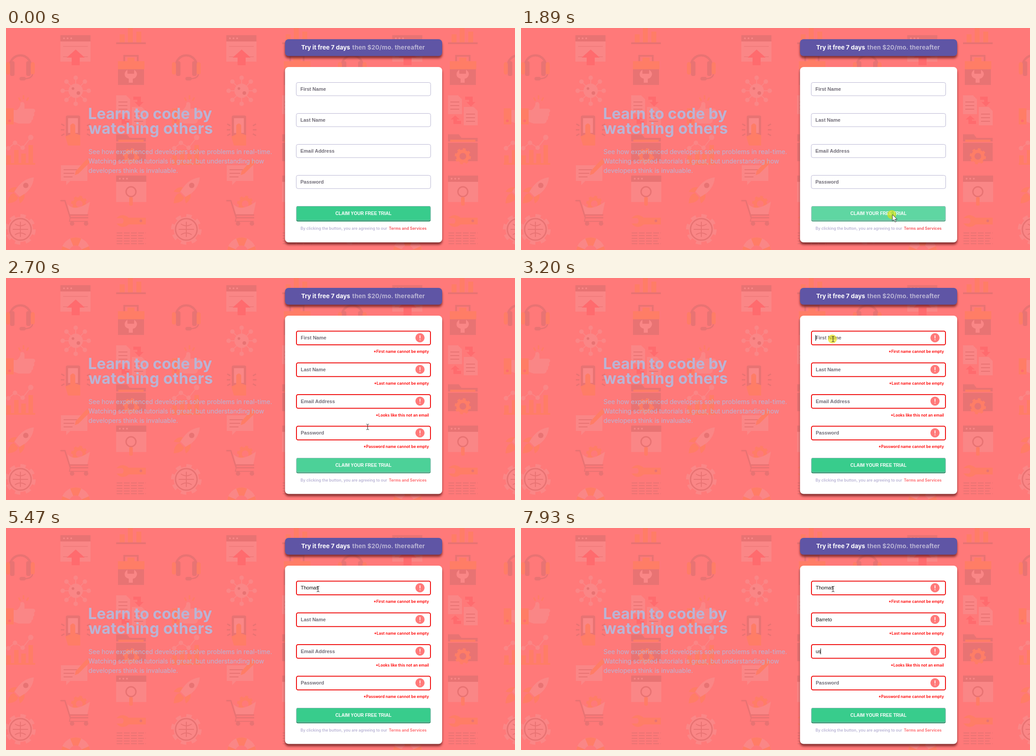
An HTML page for the animation above (8 s loop, 1132 px wide and 495 px high).

```html
<!DOCTYPE html>
<html lang="en">
<head>
<meta charset="utf-8">
<title>Sign-up form</title>
<style>
html, body { margin: 0; width: 100%; height: 100%; overflow: hidden; background: #ff7979; }
svg { display: block; width: 1132px; height: 495px; }
text { font-family: Inter, "Open Sans", sans-serif; fill: #b9b4d5; white-space: pre; }
.head { font-size: 34px; font-weight: 700; }
.body { font-size: 14px; }
.promo { font-size: 13.4px; font-weight: 700; }
.small { font-size: 8.7px; font-weight: 600; }
.hint, .value, .cta { font-family: "Liberation Sans", Arial, sans-serif; font-size: 11px; }
.hint { font-weight: 700; fill: #716d78; }
.value { fill: #111; }
.cta { font-size: 10px; font-weight: 700; fill: #fff; text-anchor: middle; }
.error { fill: #f00; text-anchor: end; }
.box { filter: drop-shadow(0 5px 2.5px rgba(60, 0, 0, .6)); }
.L { fill: #fa8686 } .D { fill: #e87373 } .O { fill: #ff7d66 } .R { fill: #ff6b6e }
.l, .d, .o { fill: none; stroke-width: 3 }
.l { stroke: #fa8686 } .d { stroke: #e87373 } .o { stroke: #ff7d66 }
</style>
</head>
<body>
<svg viewBox="0 0 1132 495">
  <defs><g id="tile"></g></defs>
  <rect width="1132" height="495" fill="#ff7979"/>
  <use href="#tile"/><use href="#tile" x="369"/><use href="#tile" x="738"/><use href="#tile" x="1107"/>
  <text class="head" x="182.5" y="203">Learn to code by</text>
  <text class="head" x="183.5" y="236" letter-spacing=".5">watching others</text>
  <text class="body" x="183.5" y="281">See how experienced developers solve problems in real-time.</text>
  <text class="body" x="183.5" y="302">Watching scripted tutorials is great, but understanding how</text>
  <text class="body" x="183.5" y="323">developers think is invaluable.</text>
  <g id="panel"></g>
</svg>
<script>
const LOOP = 8000;
const path = (c, d, more = '') => `<path class="${c}" d="${d}" ${more}/>`;
const rect = (c, x, y, w, h, r = 0) => `<rect class="${c}" x="${x}" y="${y}" width="${w}" height="${h}" rx="${r}"/>`;
const disc = (c, x, y, r, more = '') => `<circle class="${c}" cx="${x}" cy="${y}" r="${r}" ${more}/>`;
const text = (c, x, y, s, more = '') => `<text class="${c}" x="${x}" y="${y}" ${more}>${s}</text>`;
const many = (n, f) => Array.from({ length: n }, (_, i) => f(i)).join('');

// Background icons
const gear = (c, x, y, r) => disc(c, x, y, r * .62, `style="stroke-width:${r * .4}"`) +
  disc(c, x, y, r * .88, `pathLength="16" stroke-dasharray="1" style="stroke-width:${r * .25}"`);
const browser = (x, y) => rect('D', x, y, 67, 14) + rect('L', x, y + 14, 67, 45) +
  many(3, i => disc('L', x + 8 + i * 8, y + 7, 2));

const firstColumn =
  path('d', 'M9 88V84a23 23 0 0 1 46 0v4', 'style="stroke-width:5"') +
  rect('O', 0, 76, 9, 28, 5) + rect('D', 9, 74, 10, 33, 4) +
  rect('D', 45, 74, 10, 33, 4) + rect('O', 55, 76, 9, 28, 5) +
  path('d', 'M59 103q-2 10-18 10') + rect('D', 30, 109, 14, 8, 4) +
  rect('O', 0, 179, 17, 36) + disc('R', 8, 207, 3) +
  path('L', 'M17 183h7q9-8 8-16q6-5 9 2v11h20q4 1 4 5-1 3-3 4 3 6-2 9 2 5-3 8 0 6-6 7H28l-11-4z') +
  path('o', 'M39 150v9M28 155l4 7M50 155l-4 7') +
  rect('O', 1, 284, 10, 17) + rect('O', 18, 272, 10, 29) + rect('O', 34, 280, 10, 21) +
  rect('O', 50, 261, 10, 40) + rect('O', 0, 301, 65, 4) +
  path('l', 'M5 268L20 256 37 267 55 244', 'style="stroke-width:2"') +
  disc('L', 5, 268, 5) + disc('L', 20, 256, 5) + disc('L', 37, 267, 5) + disc('L', 55, 244, 6) +
  path('L', 'M62 333q-27 3-43 32l12 12q29-16 31-44z') + disc('D', 44, 351, 6) +
  path('O', 'M24 355q-12-2-20 10l13 2zM41 370q2 13-10 21l-3-13z') +
  path('O', 'M18 368q-13 3-14 23 20-2 23-13z') +
  gear('l', 32, 449, 34) + disc('d', 32, 449, 24) + disc('L', 32, 449, 17) +
  path('d', 'M15 449h34M32 432v34M20 437q12 8 24 0M20 461q12-8 24 0', 'style="stroke-width:2"');

const secondColumn =
  browser(121, 16) + path('d', 'M127 41h55M127 64h10M173 64h9', 'style="stroke-width:1"') +
  path('R', 'M155 48l20 18h-11v17h-18V66h-11z') +
  disc('L', 155, 140, 16) + disc('D', 149, 135, 3) + disc('D', 161, 145, 4) +
  many(8, i => `<g transform="rotate(${i * 45} 155 140)">${path('l', 'M155 125v-14', 'style="stroke-width:2"')}${disc('L', 155, 111, 5)}</g>`) +
  rect('D', 133, 195, 32, 48, 4) + rect('L', 138, 201, 22, 33) +
  path('O', 'M143 217q6-8 11 0v18l11 4v23h-27l-6-20 11-5z') +
  path('d', 'M122 227h8M123 240l7-4M123 214l7 4M188 227h-8M187 240l-7-4M187 214l-7 4') +
  path('L', 'M122 306h59v35h-38l-9 9v-9h-12z') +
  path('d', 'M128 316h30M128 324h24M128 332h20', 'style="stroke-width:2"') +
  path('O', 'M155 319l25-27 7 7-26 26-8 3z') +
  gear('o', 163, 392, 18) + path('L', 'M137 393q16 18 50-6l-6 29h-39z') +
  path('d', 'M121 385h10l12 38h40M141 417h42', 'style="stroke-width:3"') +
  path('d', 'M143 423l-2 8h41', 'style="stroke-width:2"') + disc('D', 147, 436, 5) + disc('D', 178, 436, 5) +
  disc('l', 155, 499, 23, 'style="stroke-width:18"') +
  disc('o', 155, 499, 23, 'pathLength="8" stroke-dasharray="1" stroke-dashoffset=".5" style="stroke-width:18"');

const thirdColumn =
  rect('O', 253, 14, 11, 18) + rect('O', 271, 0, 11, 32) + rect('O', 290, 8, 11, 24) + rect('D', 245, 32, 66, 4) +
  path('d', 'M263 74V62h30v12', 'style="stroke-width:4"') + rect('O', 270, 66, 16, 10) +
  rect('O', 249, 74, 59, 18) + rect('D', 249, 92, 58, 35) +
  path('L', 'M270 93v9h15v-9q8 6 6 12-2 7-9 8v9h-9v-9q-8-2-9-8-1-7 6-12z') +
  path('L', 'M245 150h22l9 9v33h-31zM280 176h22l9 9v32h-31z') +
  path('d', 'M250 165h20M250 173h20M250 181h20M285 192h20M285 200h20M285 208h20', 'style="stroke-width:2"') +
  path('R', 'M283 153h17v12h6l-10 10-10-10h6v-5h-9zM274 214h-17v-10h-6l10-9 10 9h-6v3h9z') +
  path('D', 'M245 237h24l6 8h36v8h-66z') + rect('O', 250, 249, 56, 5) + rect('D', 245, 256, 66, 41) +
  gear('o', 278, 286, 18) +
  browser(245, 329) + disc('d', 278, 365, 11) + rect('O', 274, 377, 8, 19, 3) +
  path('O', 'M246 424q12-13 27-1h38v15h-38q-15 12-27-2h13q5-6 0-12z') + disc('D', 300, 430, 3) +
  many(5, i => path('d', `M246 ${457 + i * 6}h${i % 2 ? 58 : 65}`, 'stroke-dasharray="13 3" style="stroke-width:2"'));

document.getElementById('tile').innerHTML = firstColumn + secondColumn + thirdColumn;

// Form: label, error, typed text, focus time, key times
const fields = [
  ['First Name', '*First name cannot be empty', 'Thomas', 3200, [4060, 4260, 4390, 4520, 4590, 4720]],
  ['Last Name', '*Last name cannot be empty', 'Barreto', 4920, [5590, 5690, 5790, 6020, 6120, 6210, 6340]],
  ['Email Address', '*Looks like this not an email', 'us', 6470, [7400, 7930]],
  ['Password', '*Password name cannot be empty', '', Infinity, []]
];
const BLINK = 530;
const pen = document.createElement('canvas').getContext('2d');
pen.font = '11px "Liberation Sans", Arial, sans-serif';

const clamp = v => Math.max(0, Math.min(1, v));
const progress = (t, from, to) => clamp((t - from) / (to - from));
const stepped = (t, from, to) => t < from ? 0 : Math.floor(progress(t, from, to) * 10 + .001) / 10;

function field([label, error, value, focus, keys], i, t, failed) {
  const y = failed ? 118.5 + i * 70.7 : 121.5 + i * 69;
  const x = failed ? 655.5 : 654.7;
  const base = y + (failed ? 18.7 : 18.2);
  const shown = value.slice(0, keys.filter(k => t >= k).length);
  let out = failed
    ? `<rect x="646" y="${y}" width="298" height="30.5" rx="3.5" fill="#fff" stroke="#f00f0f" stroke-width="2"/>`
    : `<rect x="645.5" y="${y}" width="299" height="29.5" rx="4" fill="#fff" stroke="#b9b6d3"/>`;
  out += shown ? text('value', x, base, shown) : text('hint', x, base, label);
  if (failed) {
    const mid = y + 14.7;
    out += `<circle cx="920.7" cy="${mid}" r="10.2" fill="#ff7979"/>` +
      `<path d="M920.7 ${mid - 5.5}v7M920.7 ${mid + 3.5}v2" stroke="#fff" stroke-width="1.8"/>` +
      text('small error', 940.5, y + 48.7, error);
  }
  const next = fields[i + 1];
  if (t >= focus && !(next && t >= next[3])) {
    const last = Math.max(focus, ...keys.filter(k => t >= k));
    if (Math.floor((t - last) / BLINK) % 2 === 0) {
      const cx = Math.round(x + pen.measureText(shown).width) - .5;
      out += `<path d="M${cx} ${base - 10}v13" stroke="#000"/>`;
    }
  }
  return out;
}

function pointer(t) {
  if (t < 430) return '';
  const a = stepped(t, 430, 1190), b = stepped(t, 2470, 3200);
  const x = 912 - 86 * a - 132 * b ** 1.5;
  const y = 474 - 58 * a - 280 * b;
  const clicking = (t >= 1890 && t < 1950) || (t >= 3200 && t < 3340);
  const overInput = b > 0 && (y - 117.5) % 70.7 < 32.5 && y < 362;
  return (clicking ? `<circle cx="${x - 1.5}" cy="${y}" r="10" fill="#e6e200" opacity=".6"/>` : '') +
    `<g transform="translate(${x} ${y})">` + (overInput
      ? '<path d="M-3-6h2l1 1 1-1h2M0-5v10M-3 6h2l1-1 1 1h2" fill="none" stroke="#222"/>'
      : '<path d="M0 0v14.5l3.4-3.2 2.3 5.4 2.4-1-2.3-5.2h4.7z" fill="#fff" stroke="#222" stroke-width=".9"/>') + '</g>';
}

function panel(t) {
  const failed = t >= 1950;
  const top = failed ? 22 : 25, card = failed ? 84 : 87, btn = failed ? 401 : 397;
  const hover = progress(t, 1030, 1330) - progress(t, 2560, 2860);
  return `<rect class="box" x="620.5" y="${top}" width="349.5" height="37.5" rx="8" fill="#5f55a5"/>` +
    text('promo', 656.5, top + 23.3, 'Try it free 7 days', 'style="fill:#fff"') +
    text('promo', 770, top + 23.3, 'then $20/mo. thereafter', 'letter-spacing=".2"') +
    `<rect class="box" x="620.5" y="${card}" width="349.5" height="${failed ? 397.5 : 391}" rx="8" fill="#fff"/>` +
    fields.map((f, i) => field(f, i, t, failed)).join('') +
    `<g opacity="${1 - .2 * hover}"><rect x="645.5" y="${btn}" width="299" height="34.5" rx="4" fill="#2b9367"/>` +
    `<rect x="646" y="${btn + .5}" width="298" height="31.5" rx="3.5" fill="#38cc8c" stroke="#b9b6d3" stroke-opacity=".6"/></g>` +
    text('cta', 795, btn + 19.5, 'CLAIM YOUR FREE TRIAL') +
    text('small', 655, btn + 52.5, 'By clicking the button, you are agreeing to our') +
    text('small', 851.5, btn + 52.5, 'Terms and Services', `style="font-weight:700;fill:${failed ? '#ff7074' : '#f95c64'}"`) +
    pointer(t);
}

const stage = document.getElementById('panel');
const start = performance.now();
function frame() {
  stage.innerHTML = panel((performance.now() - start) % LOOP);
  requestAnimationFrame(frame);
}
frame();
</script>
</body>
</html>
```
